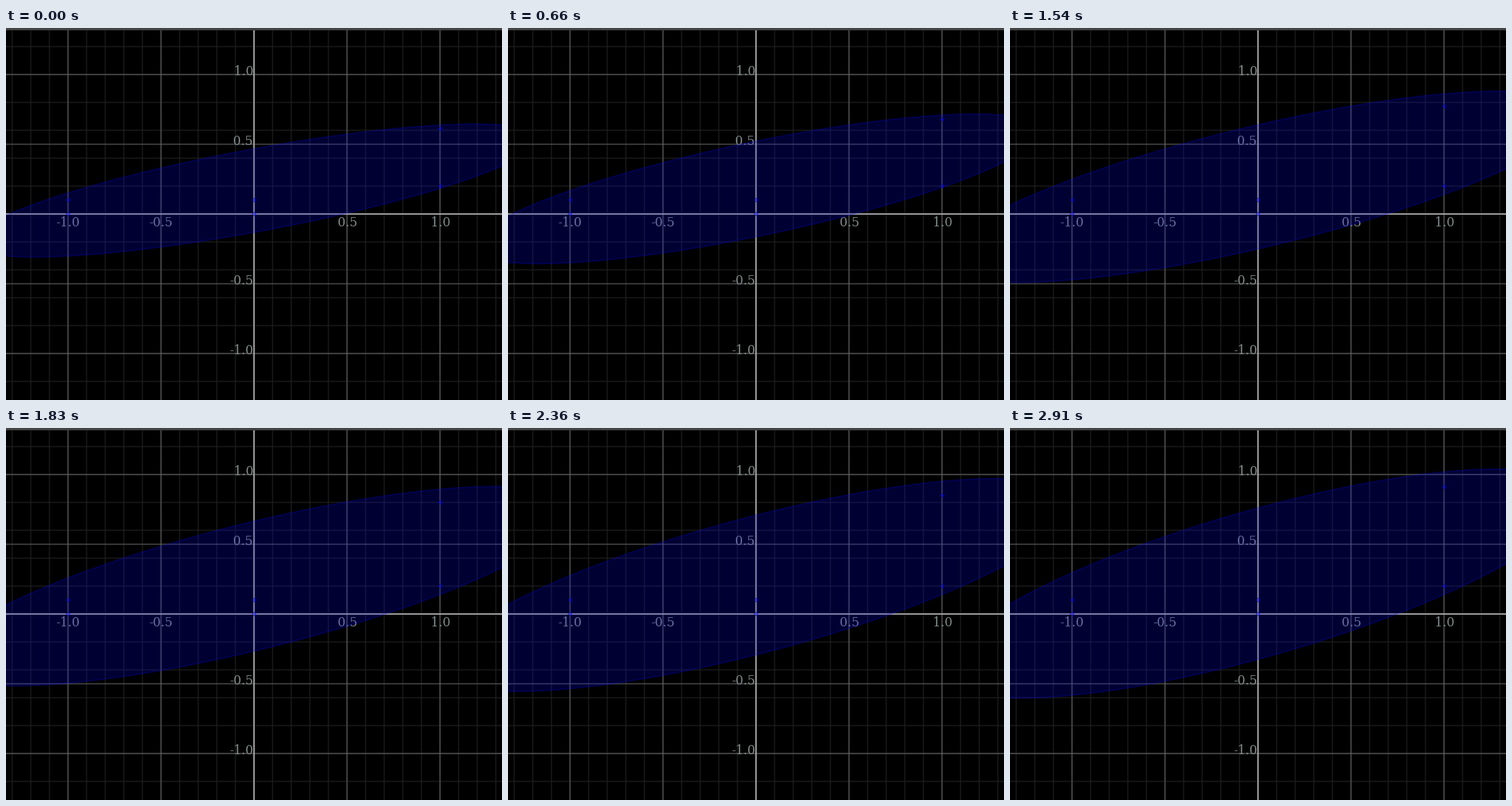
These frames come from a looping animation (640 px wide and 480 px high, 3010 ms). A matplotlib script:

```python
import numpy as np
import matplotlib.pyplot as plt
from matplotlib.animation import FuncAnimation
from matplotlib.patches import Rectangle

W, H, DPI = 640, 480, 100
SX, SY = 240, 180            # pixels per unit
CX, CY = W / 2, H / 2
PX = 72 / DPI                # one pixel in points
TICK, LOOP = 10, 3010

# start time of each of the 31 steps
STARTS = np.array([0, 70, 170, 270, 370, 470, 560, 660, 760, 860, 950, 1040,
                   1140, 1240, 1340, 1440, 1540, 1640, 1750, 1830, 1930, 2020,
                   2120, 2220, 2360, 2410, 2510, 2610, 2710, 2810, 2910])
GROW_STEP = 10               # the ellipse jumps to a larger scale here
PULL = 0.18                  # extra weight of the moving point

fig = plt.figure(figsize=(W / DPI, H / DPI), dpi=DPI, facecolor="black")
ax = fig.add_axes([0, 0, 1, 1])
ax.set_xlim(0, W)
ax.set_ylim(H, 0)
ax.axis("off")


def grid(xs, ys, shade, width=1):
    """Unsnapped lines on pixel borders, so each one covers two pixels."""
    style = dict(colors=str(shade / 255), linewidths=width * PX,
                 zorder=1, snap=False)
    ax.vlines(list(xs), 0, H, **style)
    ax.hlines(list(ys), 0, W, **style)


def label(x, y, text, align):
    ax.text(x, y, text, ha=align, va="baseline", family="DejaVu Serif",
            fontsize=16 * PX, color="#808a8a", zorder=2)


grid(range(8, W, 24), range(24, H, 36), 36)
grid(range(80, W, 120), range(60, H, 90), 104)
grid([CX], [CY], 200, 1.3)
ax.add_patch(Rectangle((0, 0), W, 3, color="#424242", lw=0, zorder=2))

for v in (-1.0, -0.5, 0.5, 1.0):
    label(CX + SX * v + (v > 0), CY + 16, f"{v:.1f}", "center")
    label(CX - 1, CY - SY * v + 1, f"{v:.1f}", "right")

area, = ax.fill([0], [0], color="blue", alpha=0.2, lw=0, zorder=3)
edge, = ax.plot([], [], color="blue", alpha=0.2, lw=2 * PX, zorder=4)
dots, = ax.plot([], [], ls="", marker="P", color="blue", alpha=0.42,
                ms=6.5 * PX, mew=0, zorder=5)
dots.set_snap(False)

ANGLE = np.linspace(0, 2 * np.pi, 181)
CIRCLE = np.array([np.cos(ANGLE), np.sin(ANGLE)])


def points(step):
    return np.array([[-1, -1, 0, 0, 1, 1],
                     [0, 0.1, 0, 0.1, 0.2, 0.61 + 0.01 * step]])


def ellipse(pts, scale):
    """Covariance ellipse around the mean, pulled towards the last point."""
    mean = pts.mean(axis=1, keepdims=True)
    dev = pts - mean
    last = dev[:, -1]
    cov = (1 - PULL) * dev @ dev.T / pts.shape[1] + PULL * np.outer(last, last)
    return mean + scale * np.linalg.cholesky(cov) @ CIRCLE


def to_pixels(pts):
    return CX + SX * pts[0], CY - SY * pts[1]


def draw(frame):
    step = int(np.searchsorted(STARTS, frame * TICK, side="right")) - 1
    pts = points(step)
    x, y = to_pixels(ellipse(pts, 1.79 if step < GROW_STEP else 2.0))
    area.set_xy(np.column_stack([x, y]))
    edge.set_data(x, y)
    dots.set_data(*to_pixels(pts))
    return area, edge, dots


anim = FuncAnimation(fig, draw, frames=LOOP // TICK, interval=TICK,
                     init_func=lambda: draw(0), repeat=True, repeat_delay=0)
plt.show()
```
